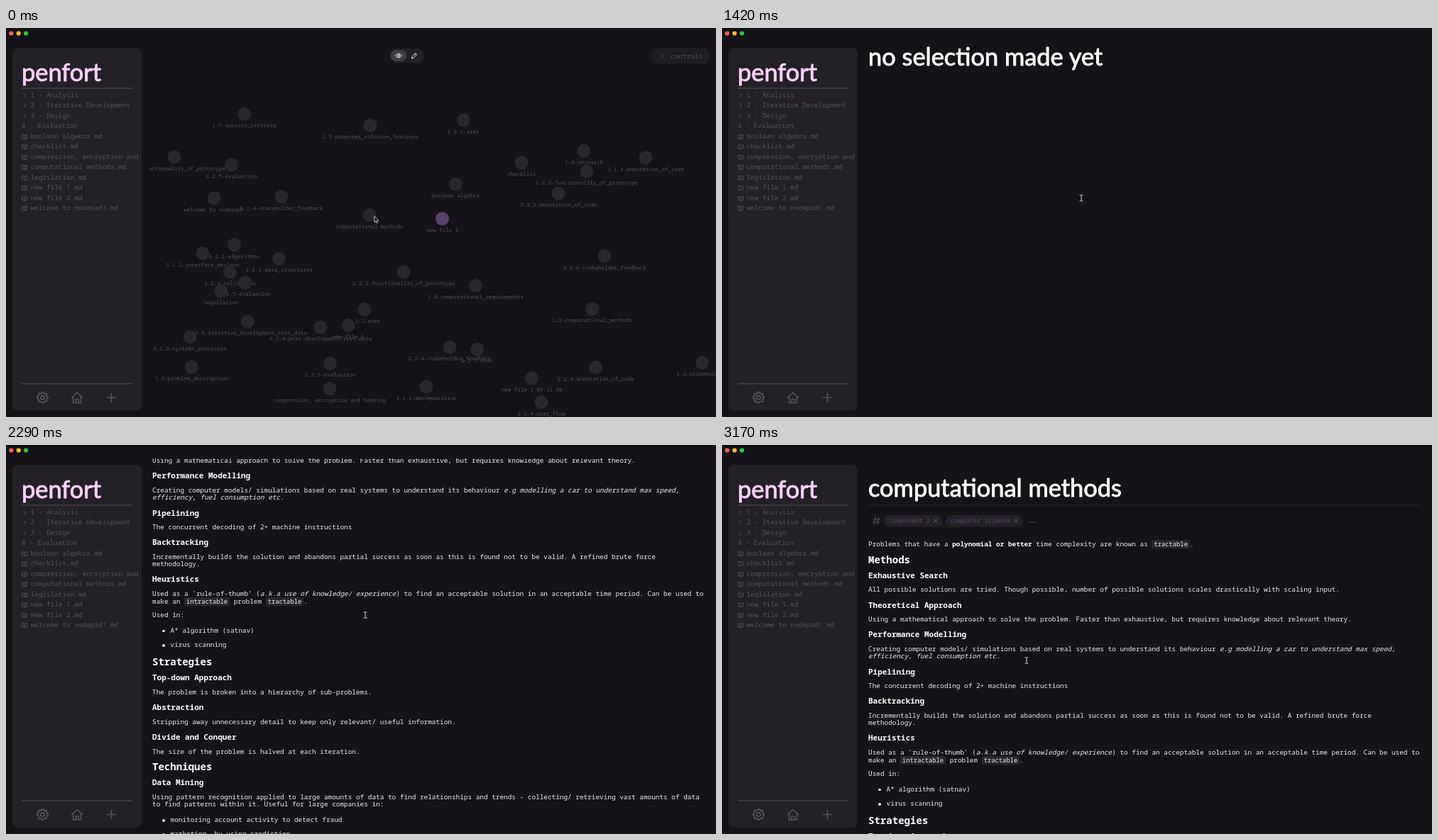
An HTML page for the animation above (3.21 s loop, 1000 by 549 pixels).

```html
<!DOCTYPE html>
<html lang="en">
<head>
<meta charset="utf-8">
<title>Notes app</title>
<style>
  :root { --bg: #151317; --panel: #232126; --dim: #555358; --loop: 3210ms; }
  html, body { margin: 0; width: 100%; height: 100%; overflow: hidden; background: var(--bg); }
  body, svg text { font: 9.38px "Noto Sans Mono", "DejaVu Sans Mono", monospace; font-variant-ligatures: none; }
  #stage { position: relative; width: 1000px; height: 549px; overflow: hidden; background: var(--bg); }
  #stage > * { position: absolute; }
  .layer { left: 0; top: 0; width: 1000px; height: 549px; }
  .icon { fill: none; stroke: var(--dim); stroke-linecap: round; stroke-linejoin: round; }
  .panel { fill: var(--panel); }
  svg .title { font: 34.4px Lato, "Open Sans", sans-serif; stroke-width: .9; stroke-linejoin: round; }
  .white { fill: #fff; stroke: #fff; }
  .pink { fill: #fdd0fb; stroke: #fdd0fb; }

  /* sidebar */
  #files { left: 22px; top: 87.5px; width: 165px; overflow: hidden; color: var(--dim); }
  #files div { position: relative; height: 14.53px; line-height: 14.53px; white-space: pre; }
  #files .sub { padding-left: 12.4px; }
  #files svg { position: absolute; left: 0; top: 3px; }

  /* graph */
  #graph { left: 202px; top: 0; }
  #nodes circle { fill: #29272c; }
  #nodes text { font-size: 7.52px; fill: #535156; text-anchor: middle; }
  #nodes .current circle { fill: #59406f; }
  #dragged { animation: drag var(--loop) ease-in-out infinite; }
  #pushed { animation: push var(--loop) ease-in-out infinite; }

  /* document */
  #doc { left: 200px; top: 19px; width: 800px; height: 530px; overflow: hidden; }
  #page { position: absolute; left: -200px; top: -19px; width: 1000px; height: 900px;
          animation: scroll var(--loop) linear infinite; }
  #page > svg { position: absolute; left: 0; top: 0; }
  #page .tag { font-size: 8.8px; fill: #59406f; }
  .line { position: absolute; left: 206px; margin-top: -8.6px; line-height: 16px; white-space: pre; color: #efedf1; }
  .h2 { font-size: 14.07px; }
  .h3 { font-size: 10.97px; }
  .h2, .h3, .line b { font-weight: 600; color: #fff; }
  .li { left: 231.5px; }
  .li::before { content: ""; position: absolute; left: -11.2px; top: 7px; width: 3.5px; height: 3.5px;
                border-radius: 50%; background: #efedf1; }
  code { font: inherit; font-size: .94em; padding: 0 3px; border-radius: 2px; background: #29272c; }
  .arrow { width: 2ch; height: 7px; vertical-align: -1px; fill: none; stroke: #efedf1; }

  /* what is on show */
  #graph, #pointer { animation: show-graph var(--loop) step-end infinite; }
  #empty { animation: show-empty var(--loop) step-end infinite; }
  #doc { animation: show-doc var(--loop) step-end infinite; }
  #pointer path { animation: point var(--loop) ease-in-out infinite; }
  #ibeam { animation: show-ibeam var(--loop) step-end infinite; }
  #ibeam path { animation: ibeam var(--loop) step-end infinite; }

  @keyframes show-graph { 0% { visibility: visible } 38.94%, 100% { visibility: hidden } }
  @keyframes show-empty { 0% { visibility: hidden } 38.94% { visibility: visible } 45.48%, 100% { visibility: hidden } }
  @keyframes show-doc { 0% { visibility: hidden } 45.48%, 100% { visibility: visible } }
  @keyframes show-ibeam { 0% { visibility: hidden } 38.94%, 100% { visibility: visible } }
  @keyframes drag {
    0%, 1.25% { transform: translate(512px, 264.5px) }
    18.07% { transform: translate(548px, 265px) }
    25.86% { transform: translate(520px, 228.5px) }
    33.64%, 100% { transform: translate(505.5px, 238px) }
  }
  @keyframes push {
    0%, 1.25% { transform: translate(614.5px, 269.3px) }
    18.07%, 100% { transform: translate(615px, 268.9px) }
  }
  @keyframes point {
    0%, 1.25% { transform: translate(518.7px, 265.5px) }
    18.07% { transform: translate(549.7px, 263px) }
    25.86% { transform: translate(521.5px, 230px) }
    33.64%, 100% { transform: translate(506px, 240px) }
  }
  @keyframes ibeam {
    0% { transform: translate(506px, 240px) }
    97.51% { transform: translate(468px, 272px) }
    98.75%, 100% { transform: translate(429px, 304px) }
  }
  @keyframes scroll {
    0%, 46.73% { transform: translateY(0) }
    54.52%, 57.01% { transform: translateY(-210px) }
    63.86% { transform: translateY(-326px) }
    66.36% { transform: translateY(-320px) }
    71.34% { transform: translateY(-225px) }
    76.64% { transform: translateY(-70px); animation-timing-function: ease-out }
    81.93%, 100% { transform: translateY(0) }
  }
</style>
</head>
<body>
<div id="stage">
  <svg class="layer" viewBox="0 0 1000 549">
    <rect class="panel" x="9" y="28" width="182" height="512" rx="8"/>
    <text class="title pink" x="22" y="75">penfort</text>
    <path d="M22 85H178M22 502H178" stroke="#555358" stroke-width="1.2"/>
    <g class="icon" stroke-width="1.7">
      <path id="gear"/>
      <circle cx="51.5" cy="521.5" r="2.7"/>
      <path d="M92.5 521.5L100 514.5L107.5 521.5M94.5 520V529H105.5V520M98 529V524H102V529"/>
      <path d="M148.5 515.5V527.5M142.5 521.5H154.5"/>
    </g>
  </svg>
  <div id="files"></div>

  <svg id="graph" width="798" height="549" viewBox="202 0 798 549">
    <g id="nodes"></g>
    <rect class="panel" x="540" y="28.5" width="49" height="21" rx="10.5"/>
    <rect x="542" y="31" width="22" height="16" rx="8" fill="#403e44"/>
    <g class="icon" style="stroke:#eee">
      <path d="M548.5 39Q553 33.2 557.5 39Q553 44.8 548.5 39Z"/>
      <circle cx="553" cy="39" r="1.3"/>
      <path d="M571.5 42.7L572.2 40.2L576.8 35.5L578.7 37.4L574 42ZM575.7 36.7L577.5 38.5"/>
    </g>
    <rect x="909" y="28" width="81.5" height="22.5" rx="8" fill="#1f1d22"/>
    <path class="icon" d="M923 36.5L925.5 39.3L923 42.1"/>
    <text x="936" y="42.5" fill="#555358">controls</text>
  </svg>

  <svg id="empty" class="layer" viewBox="0 0 1000 549">
    <text class="title white" x="206" y="53">no selection made yet</text>
  </svg>

  <div id="doc"><div id="page">
    <svg width="1000" height="130">
      <text class="title white" x="206" y="73">computational methods</text>
      <path d="M206 85H984" stroke="#2b292e"/>
      <path class="icon" d="M216 102L214.5 112M220.5 102L219 112M213 105H222.5M212.5 109H222"/>
      <rect class="panel" x="228" y="99" width="83" height="16.5" rx="8"/>
      <rect class="panel" x="315" y="99" width="109" height="16.5" rx="8"/>
      <text class="tag" x="235" y="110.2">component 2</text>
      <text class="tag" x="322" y="110.2">computer science</text>
      <path class="icon" style="stroke:#6b587c" d="M298.5 104.5L303.5 109.5M303.5 104.5L298.5 109.5M411.7 104.5L416.7 109.5M416.7 104.5L411.7 109.5"/>
      <path class="icon" stroke-width="1.8" d="M433 109h0M437 109h0M441 109h0"/>
    </svg>
  </div></div>

  <svg class="layer" viewBox="0 0 1000 549">
    <circle cx="7.3" cy="7.5" r="3.1" fill="#fe5f57"/>
    <circle cx="17.7" cy="7.5" r="3.1" fill="#febc2e"/>
    <circle cx="28.1" cy="7.5" r="3.1" fill="#28c840"/>
    <path d="M0 .5H1000" stroke="#0a090b"/>
  </svg>
  <svg id="pointer" class="layer" viewBox="0 0 1000 549">
    <path d="M0 0V8.6L2 6.9L3.3 9.8L4.7 9.2L3.4 6.3L6 6.1Z" fill="#111" stroke="#ddd" stroke-width=".9"/>
  </svg>
  <svg id="ibeam" class="layer" viewBox="0 0 1000 549">
    <path fill="none" stroke="#aaa8ad" stroke-width="1.3"
      d="M-2.5 -4.3Q0 -4.3 0 -3Q0 -4.3 2.5 -4.3M0 -3V3M-2.5 4.3Q0 4.3 0 3Q0 4.3 2.5 4.3"/>
  </svg>
</div>

<script>
  const $ = id => document.getElementById(id);

  // Gear outline: eight soft teeth
  const teeth = Array.from({ length: 96 }, (_, i) => {
    const a = i / 96 * 2 * Math.PI, r = 6.9 + 0.85 * Math.tanh(3 * Math.cos(8 * a));
    return `${(51.5 + r * Math.cos(a)).toFixed(2)} ${(521.5 + r * Math.sin(a)).toFixed(2)}`;
  });
  $('gear').setAttribute('d', `M${teeth.join('L')}Z`);

  // Sidebar entries
  const chevron = 'M3 2L5.5 4.5L3 7';
  const book = 'M4.2 2.5Q2.5 1.5 .8 1.7V7Q2.5 6.8 4.2 7.7Q6 6.8 7.7 7V1.7Q6 1.5 4.2 2.5V7.7';
  const entry = (name, icon) => icon
    ? `<div class="sub"><svg class="icon" width="9" height="9"><path d="${icon}"/></svg>${name}</div>`
    : `<div>${name}</div>`;
  const folders = ['1 - Analysis', '2 - Iterative Development', '3 - Design'];
  const files = ['boolean algebra', 'checklist', 'compression, encryption and hashing', 'computational methods',
    'legislation', 'new file 1', 'new file 2', 'welcome to nodepad!'];
  $('files').innerHTML = folders.map(f => entry(f, chevron)).join('') + entry('4 - Evaluation') +
    files.map(f => entry(f + '.md', book)).join('');

  // Graph nodes, back to front: x, y, label
  const nodes = `335.5 121.5 1.7-success_criteria
513 137.5 1.5-proposed_solution_features
644 130 2.3.1-aims
237 182 2.3.2-functionality_of_prototype
317.5 193 2.2.5-evaluation
814 173.5 1.4-research
901 183 2.1.3-annotation_of_code
726 190 checklist
818 202.5 2.1.2-functionality_of_prototype
633 220.5 boolean algebra
778 233.5 2.3.3-annotation_of_code
293 240 welcome to nodepad!
388 238 2.1.4-stakeholder_feedback
321.5 306 3.2.1-algorithms
277 318 3.1.3-interface_designs
384.5 325.5 3.2.3-data_structures
315.5 344.5 3.2.4-validation
337 359.5 2.1.5-evaluation
302.5 371.5 legislation
843 322 2.3.4-stakeholder_feedback
560 344.5 2.2.2-functionality_of_prototype
661.5 363.5 1.6-computational_requirements
825.5 396.5 1.3-computational_methods
505 397 2.1.1-aims
482 419.5 new file 1
340.5 414.5 3.2.5-iterative_development_test_data
443 422.5 3.2.6-post-development-test-data
259 436 3.1.2-systems_processes
261.5 478.5 1.1-problem_description
456.5 473.5 2.3.5-evaluation
625 450.5 2.2.4-stakeholder_feedback
663.5 453.5 2.2.1-aims
456 509 compression, encryption and hashing
592 506 3.1.1-decomposition
740.5 494.5 new file 1 09.11.58
830.5 479 2.2.3-annotation_of_code
980.5 472.5 1.2-stakeholders
754 528 3.1.4-user_flow`;
  const node = (label, attrs) => `<g ${attrs}><circle r="9.5"/><text y="18.7">${label}</text></g>`;
  $('nodes').innerHTML = nodes.split('\n').map(row => {
    const [x, y, ...label] = row.split(' ');
    return node(label.join(' '), `transform="translate(${x} ${y})"`);
  }).join('') + node('computational methods', 'id="dragged"') + node('new file 2', 'id="pushed" class="current"');

  // Document lines: centre y, kind, markup
  const arrow = '<svg class="arrow" viewBox="0 0 11.3 7"><path d="M1 3.5H10M7.3 .9L10 3.5L7.3 6.1"/></svg>';
  const lines = [
    [141, 'p', 'Problems that have a <b>polynomial or better</b> time complexity are known as <code>tractable</code>.'],
    [162.5, 'h2', 'Methods'],
    [184.5, 'h3', 'Exhaustive Search'],
    [205, 'p', 'All possible solutions are tried. Though possible, number of possible solutions scales drastically with scaling input.'],
    [226.5, 'h3', 'Theoretical Approach'],
    [247, 'p', 'Using a mathematical approach to solve the problem. Faster than exhaustive, but requires knowledge about relevant theory.'],
    [268, 'h3', 'Performance Modelling'],
    [289, 'p', 'Creating computer models/ simulations based on real systems to understand its behaviour <i>e.g modelling a car to understand max speed,</i>'],
    [299, 'p', '<i>efficiency, fuel consumption etc.</i>'],
    [320.5, 'h3', 'Pipelining'],
    [341, 'p', 'The concurrent decoding of 2+ machine instructions'],
    [362, 'h3', 'Backtracking'],
    [383, 'p', 'Incrementally builds the solution and abandons partial success as soon as this is found not to be valid. A refined brute force'],
    [393, 'p', 'methodology.'],
    [414, 'h3', 'Heuristics'],
    [435, 'p', "Used as a 'rule-of-thumb' (<i>a.k.a use of knowledge/ experience</i>) to find an acceptable solution in an acceptable time period. Can be used to"],
    [445.5, 'p', 'make an <code>intractable</code> problem <code>tractable</code>.'],
    [465, 'p', 'Used in:'],
    [486.5, 'li', 'A* algorithm (satnav)'],
    [507, 'li', 'virus scanning'],
    [531, 'h2', 'Strategies'],
    [553, 'h3', 'Top-down Approach'],
    [573.5, 'p', 'The problem is broken into a hierarchy of sub-problems.'],
    [594.5, 'h3', 'Abstraction'],
    [615.5, 'p', 'Stripping away unnecessary detail to keep only relevant/ useful information.'],
    [636.5, 'h3', 'Divide and Conquer'],
    [657.5, 'p', 'The size of the problem is halved at each iteration.'],
    [679, 'h2', 'Techniques'],
    [701, 'h3', 'Data Mining'],
    [721.5, 'p', 'Using pattern recognition applied to large amounts of data to find relationships and trends - collecting/ retrieving vast amounts of data'],
    [731.5, 'p', 'to find patterns within it. Useful for large companies in:'],
    [754, 'li', 'monitoring account activity to detect fraud'],
    [774, 'li', 'marketing, by using prediction'],
    [796, 'p', '<b>Big Data</b> - a dataset that cannot be perceived, acquired, managed, processed, or served within tolerable time by using traditional IT and'],
    [806, 'p', `software tools ${arrow} a dataset that exceeds the scope of a simple database.`],
    [825, 'p', '<b>Visualisation</b> is used alongside data mining to give us a graphical representation of data to make patterns easier to spot.'],
    [844, 'p', '<b><i>In the exam, there will be:</i></b>'],
    [864, 'p', "<b><i>2 9 markers, 1 12 marker - these aren't on this topic, I just wrote this here because I'm lazy.</i></b>"],
  ];
  $('page').insertAdjacentHTML('beforeend',
    lines.map(([y, kind, html]) => `<div class="line ${kind}" style="top:${y}px">${html}</div>`).join(''));
</script>
</body>
</html>
```
